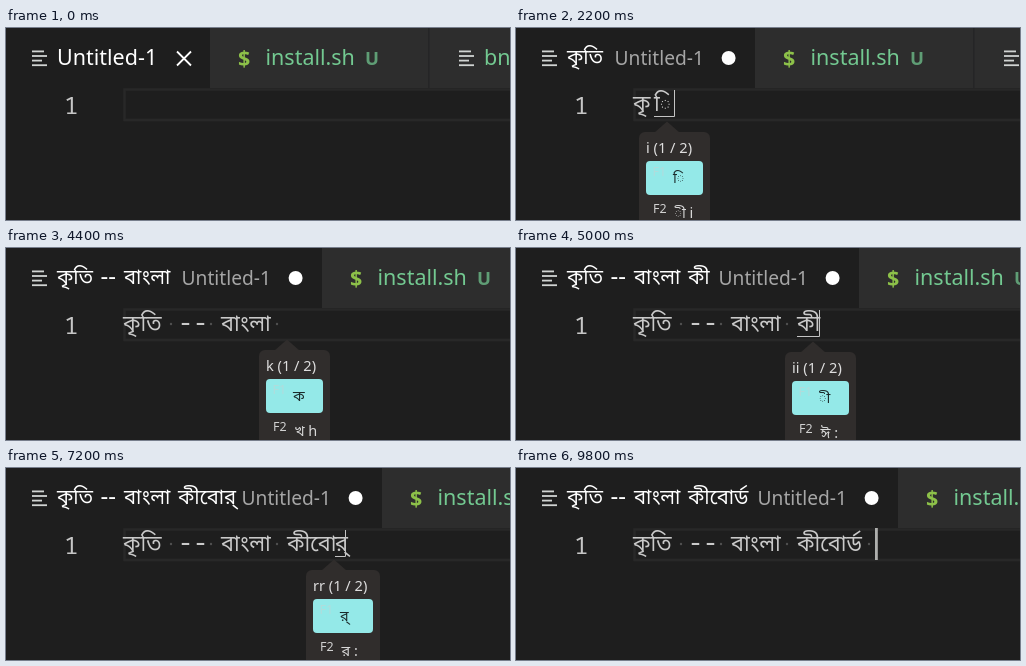
An HTML page for the animation above (10000 ms loop, 504 by 192 pixels).

```html
<!DOCTYPE html>
<html lang="bn">
<head>
<meta charset="utf-8">
<title>Typing Bangla</title>
<style>
html, body { margin: 0; width: 100%; height: 100%; overflow: hidden; background: #1e1e1e; }
svg { display: block; width: 504px; height: 192px; }
text { font-family: 'Noto Sans', 'Noto Sans Bengali', sans-serif; white-space: pre; }
.name { font-size: 21.5px; fill: #fff; }
.title { font-size: 20.2px; font-weight: 300; fill: #fff; }
.title.dash { font-size: 24px; }
.path { font-size: 19.2px; fill: #a6a6a6; }
.green { fill: #73c991; }
.code { font: 300 21.7px 'Noto Sans Mono', 'Noto Sans Bengali', 'Noto Sans', monospace; fill: #cacaca; }
.code.dash { font-size: 25px; }
.line { font: 500 24px 'Noto Sans Mono', monospace; fill: #c6c6c6; }
.head { font-size: 14.6px; fill: #dedede; }
.pick { font-size: 14.5px; }
.key { font-size: 12.5px; fill: #d0d0d0; }
</style>
</head>
<body>
<svg viewBox="0 0 504 192"></svg>
<script>
const LOOP = 10000;
const codeStops = [117, 172, 215, 281];
const titleStops = [51, 94.5, 118, 172];
const spaceDots = [165, 205, 271, 353];

// key: [choice count, first choice, second choice, width]
const menus = {
  k: [2, 'ক', 'খ h', 71],
  r: [4, 'র', '◌ৃ ri', 74],
  ri: [2, '◌ৃ', 'ঋ :', 74],
  t: [4, 'ত', 'থ h', 71],
  i: [2, '◌ি', '◌ী i', 71],
  ii: [2, '◌ী', 'ঈ :', 71],
  b: [2, 'ব', 'ভ h', 71],
  a: [2, '◌া', 'আ a', 72],
  ng: [3, '◌ং', 'ঙ :', 75],
  l: [2, 'ল', 'ঌ i', 71],
  o: [2, '◌ো', '◌ৌ u', 73],
  rr: [2, 'র্', 'র :', 74],
  D: [3, 'ড', 'ঢ h', 73]
};

const W1 = 'কৃতি', W2 = W1 + ' -- ', W3 = W2 + 'বাংলা ';
// time, committed text, composing text, its x, caret x, title, title end, menu key, menu x
const steps = [
  [0, '', '', 0, 118, '', 0],
  [1000, '', '', 0, 0, '', 0, 'k', 89],
  [1200, '', 'ক', 117, 134, 'ক', 67, 'k', 89],
  [1400, 'ক', 'র', 134, 146, 'কর', 78, 'r', 106],
  [1600, 'কৃ', '', 117, 136, 'কৃ', 67, 'ri', 106],
  [1800, 'কৃ', 'ত', 135, 151, 'কৃত', 82, 't', 107],
  [2200, 'কৃ', '◌ি', 138, 159, W1, 89, 'i', 123],
  [2400, W1 + ' -', '', 0, 188, W1 + ' -', 104],
  [2600, W2, '', 0, 215, W1 + ' --', 112],
  [2800, W2, 'ব', 216, 231, W2 + 'ব', 132, 'b', 188],
  [3000, W2, 'বা', 216, 238, W2 + 'বা', 138, 'a', 203],
  [3200, W2, '◌ং', 217, 244, W2 + 'বাং', 145, 'ng', 217],
  [3600, W2 + 'বাং', 'ল', 245, 261, W2 + 'বাংল', 161, 'l', 217],
  [4000, W2 + 'বাংলা', '', 245, 267, W2 + 'বাংলা', 166, 'a', 232],
  [4200, W3, '', 0, 281, W2 + 'বাংলা', 166],
  [4400, W3, '', 0, 0, W2 + 'বাংলা', 166, 'k', 253],
  [4600, W3, 'ক', 281, 297, W3 + 'ক', 187, 'k', 253],
  [4800, W3 + 'কি', '', 281, 304, W3 + 'কি', 193, 'i', 269],
  [5000, W3 + 'কী', '', 281, 304, W3 + 'কী', 193, 'ii', 269],
  [5200, W3 + 'কী', 'ব', 304, 318, W3 + 'কীব', 205, 'b', 276],
  [5600, W3 + 'কীবো', '', 304, 329, W3 + 'কীবো', 214, 'o', 290],
  [6000, W3 + 'কীবো', 'র', 329, 340, W3 + 'কীবোর', 226, 'r', 300],
  [6800, W3 + 'কীবো', 'র্', 329, 340, W3 + 'কীবোর্', 226, 'rr', 300],
  [7600, W3 + 'কীবো', 'ড', 329, 345, W3 + 'কীবোর্ড', 232, 'D', 310],
  [8800, W3 + 'কীবোর্ড ', '', 0, 360.5, W3 + 'কীবোর্ড', 232]
];

// time, caret opacity while nothing is being composed
const blink = [[0, 0], [200, .5], [400, 1], [9200, .5], [9400, 0], [9800, 1]];

const rect = (x, y, w, h, fill, more = '') =>
  `<rect x="${x}" y="${y}" width="${w}" height="${h}" fill="${fill}" ${more}/>`;
const text = (x, y, cls, s, more = '') =>
  `<text x="${x}" y="${y}" class="${cls}" ${more}>${s}</text>`;
const words = (s, stops, y, cls) => s.split(' ').map((w, i) =>
  w ? text(stops[i], y, w[0] === '-' ? cls + ' dash' : cls, w) : '').join('');
const fileIcon = x =>
  [12, 15, 10, 15].map((w, i) => rect(x, 22.5 + i * 4.6, w, 1.8, '#d0d3d2')).join('');
const at = (table, t) => table.findLast(row => row[0] <= t);

function tabs(title, end) {
  const x = end ? end + 150 : 204;
  const first = end
    ? words(title, titleStops, 36, 'title') + text(x - 140.5, 37, 'path', 'Untitled-1') +
      `<circle cx="${x - 26.4}" cy="30" r="7" fill="#fff"/>`
    : text(51, 37, 'name', 'Untitled-1') +
      '<path d="M171 23.500l14 14m0-14l-14 14" stroke="#fff" stroke-width="1.8"/>';
  return fileIcon(26) + first +
    rect(x, 0, 504, 60, '#2d2d2d') + rect(x + 218, 0, 1.5, 60, '#252526') +
    text(x + 28, 37.5, 'name', '$', 'style="fill:#8dc149;font-weight:600"') +
    text(x + 55.5, 37, 'name green', 'install.sh') +
    text(x + 155, 37, 'name green', 'U', 'style="font-size:18.5px;font-weight:600" opacity=".72"') +
    fileIcon(x + 249) + text(x + 274, 37, 'name green', 'bn');
}

function editor(doc, pre, preX, caretX, alpha) {
  const dots = spaceDots.slice(0, doc.split(' ').length - 1);
  let out = '<rect x="118.500" y="61.500" width="400" height="30.500" fill="none" stroke="#282828" stroke-width="2.5"/>' +
    text(58, 86, 'line', '1') + words(doc, codeStops, 83, 'code') +
    dots.map(x => `<circle cx="${x}" cy="76" r="1.2" fill="#505050"/>`).join('');
  if (pre) out += text(preX, 83, 'code', pre);
  if (preX) out += `<path d="M${preX} 88.500H${caretX - .5}V62" fill="none" stroke="#c4c4c4"/>`;
  else if (caretX) out += rect(caretX - 1.5, 60, 2.8, 32, '#aeafad', `opacity="${alpha}"`);
  return out;
}

function menu(key, x) {
  const [count, pick, next, w] = menus[key];
  // Rows holding a combining sign are taller and sit lower.
  const y = (pick + next).includes('◌') ? 104 : 102;
  return `<g transform="translate(${x} ${y})">` +
    '<path d="M15 1l13-11.500l13 11.500z" fill="#302d2c"/>' +
    rect(0, 0, w, 100, '#302d2c', 'rx="6"') +
    text(7, 20.5, 'head', `${key} (1 / ${count})`) +
    rect(7, 29, w - 14, 34, '#94e9e8', 'rx="4"') +
    text(13.5, 44, 'key', 'F1', 'style="fill:#c4d4d4" opacity=".6"') +
    text(34, 51, 'pick', pick, 'fill="#1b2b2b"') +
    text(14, 80.5, 'key', 'F2') +
    text(35.5, 85.5, 'pick', next, 'fill="#d8d8d8"') + '</g>';
}

const stage = document.querySelector('svg');
const start = performance.now();
let shown = '';

function draw() {
  const t = (performance.now() - start) % LOOP;
  const [, doc, pre, preX, caretX, title, end, key, menuX] = at(steps, t);
  const picture = rect(0, 0, 504, 192, '#1e1e1e') + tabs(title, end) +
    editor(doc, pre, preX, caretX, at(blink, t)[1]) + (key ? menu(key, menuX) : '');
  if (picture !== shown) stage.innerHTML = shown = picture;
  requestAnimationFrame(draw);
}
draw();
</script>
</body>
</html>
```
